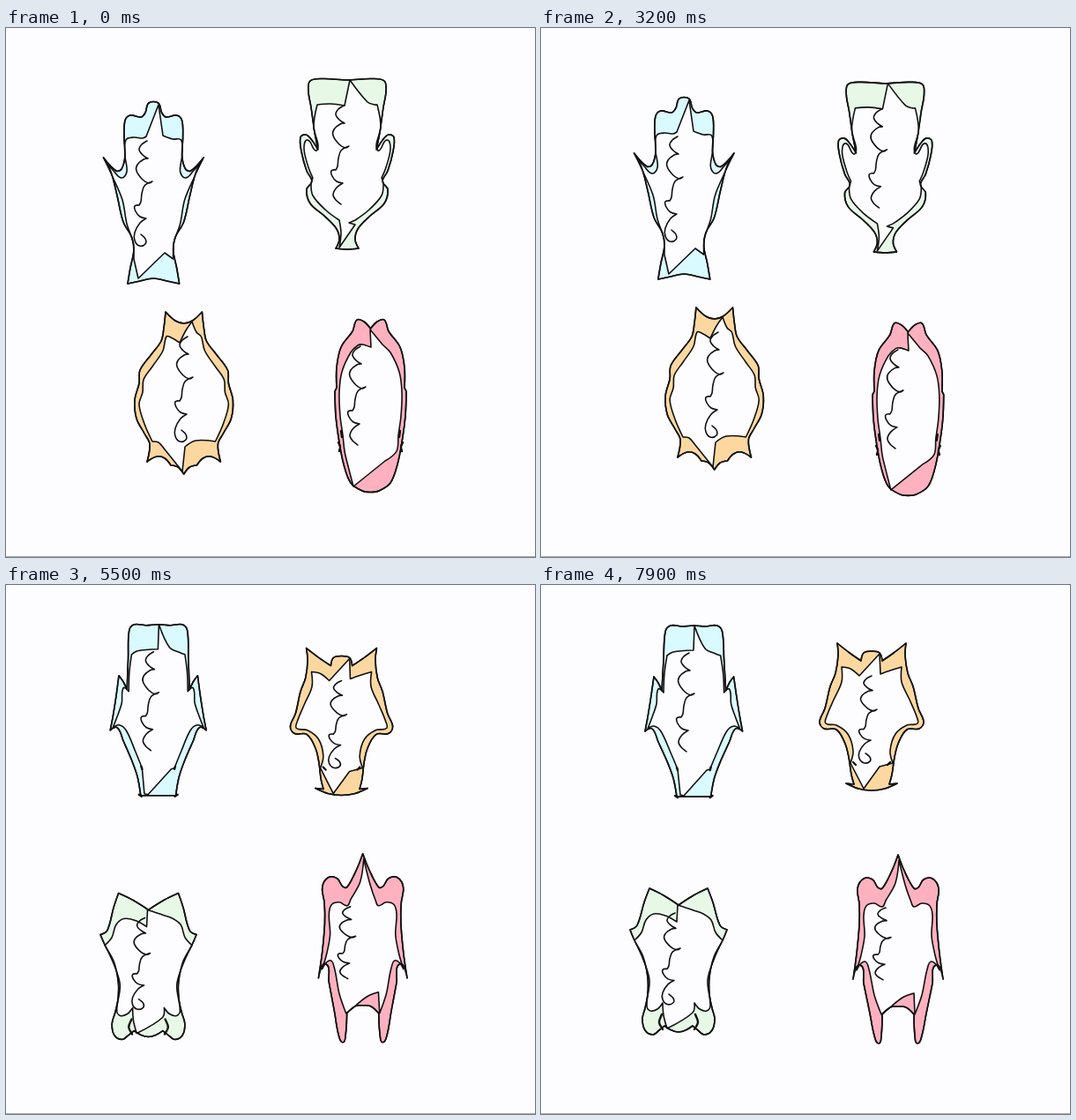
An HTML page with a canvas that plays this animation: 600x600 px, repeating every 8 s.

```html
<!DOCTYPE html>
<html>
<head>
<meta charset="utf-8">
<style>
html, body { margin: 0; width: 100%; height: 100%; overflow: hidden; background: #fdfcff; }
canvas { display: block; }
</style>
</head>
<body>
<canvas id="stage" width="600" height="600"></canvas>
<script>
const ctx = document.getElementById('stage').getContext('2d');
const PAPER = '#fdfcff', INK = '#111';
const BLUE = '#d9fafe', GREEN = '#e7f8e7', ORANGE = '#fcd8a0', PINK = '#ffb1bf';
const LOOP = 8000, STEP = 100, SWITCH = 4500, WOBBLE = 3600;

// Points are "x,y"; a trailing ! marks a sharp corner.
const parse = text => text.split(' ').filter(Boolean).map(p => {
  const [x, y] = p.split(',').map(parseFloat);
  return { x, y, sharp: p.endsWith('!') };
});

// outer and side list the left half from top to bottom; the right half is mirrored.
// top runs left to right, bottom right to left.
const early = [
  { color: BLUE, axis: 167.3, drift: [-7, -7, 0], curl: [160, 128, 1, true],
    outer: `167.3,83.5 161,86 158,96 153,101 141,99 135,105 134,125 135,145 131,160 125,162 110.5,147!
      119,163 126,190 133,220 143,238 145,252 141,272 138,290! 152,287 167.3,284`,
    top: '145,124 155,125 159,123! 173,87! 178,122! 189,126',
    side: '136,127 135,145 137,163 131,170 122,162 112,150! 121,169 132,195 137,222 144,243 145,262!',
    bottom: '180,255! 150,284!' },
  { color: GREEN, axis: 387, drift: [3.5, 4, 1], curl: [383, 88, 1, false],
    outer: `387,59 360,57.5 345,60 343,72 346,90 350,118 354,138! 346,126 340,121 334,124 335,140 341,162 347,174
      341,183 345,199 362,214 375,228 378,240 374,250! 387,251`,
    top: '368,86 384,88! 390,59! 410,84 418,87',
    side: '353,87! 349,112 354,133 351,139 342,127 338,137 343,158 348,170! 346,177 348,190 362,206 378,218!',
    bottom: '389,221! 396,223! 378,249! 380,233' },
  { color: ORANGE, axis: 201.7, drift: [-7, -7, 0], curl: [206, 350, 1, true],
    outer: `201.7,335 192,332 181,322! 179,340 176,355 165,370 152,388 151,403 146,422 148,443 157,460
      163,472 160,492! 171,486 180,488 187,496! 195,498 201.7,506!`,
    top: '187,351 197,357! 204,343 211,333! 216,345',
    side: '182,350 178,366 166,384 156,399 155,413 151,427 157,449 166,469!',
    bottom: '215,468 203,475! 200,503! 180,478 173,470' },
  { color: PINK, axis: 413.5, drift: [3, 4, 1], curl: [402, 361, 1, false],
    outer: `413.5,341! 406,333 398,331 393,344 380,362 375,385 375,408! 373,412! 374,440 378,470 383,495
      391,516 404,525 413.5,526.5`,
    top: '404,359 414,362! 413,342! 427,359',
    side: '399,360 391,368 381,390 378,413 379,440 382,462 384,480',
    bottom: '430,491! 394,520! 387,493',
    hands: ['380,457 381,464', '377,470 379,475 378,480'] }
];
const late = [
  { color: BLUE, axis: 173.3, drift: [2, 4, 1], curl: [168, 77, 1, false],
    outer: `173.3,46 160,47 147,46 141,53 139,85 137,120! 133,111 128,104! 125,125 121,150 118,166! 126,163
      133,178 143,200 150,219 154,240! 173.3,240`,
    top: '150,76 173,74! 174,46! 186,72 198,78',
    side: '143,80! 140,100 139,122! 133,118 131,135 126,150 121,163! 128,160 136,166 147,190 155,209!',
    bottom: '188,210! 162,239! 158,238!',
    hands: ['152,239 155,241', '154,207 155,210'] },
  { color: ORANGE, axis: 375, drift: [-8.4, -8.4, 0], curl: [375, 103, .83, true],
    outer: `375,75 366,77 363,86! 350,77 336,66! 337,80 334,100 328,115 322,140 316,155 321,163 335,164
      345,180 350,201! 352,215 355,226! 346,225! 360,231 375,233`,
    top: '351,95 361,103! 384,78! 385,101! 396,97',
    side: '341,93! 341,110 332,130 324,149 323,157 335,159 348,169 354,188 351,202!',
    bottom: '384,206! 366,231!',
    hands: ['354,201 357,204'] },
  { color: GREEN, axis: 156, drift: [-8.4, -8.4, 0], curl: [152, 372, .87, true],
    outer: `156,363! 139,352 123,344! 117,360 109,386 101,391! 106,403 116,422 121,445 121,464 118,480
      115,492 118,505 127,510 134,505 140,500! 148,505 156,507`,
    top: '141,375 154,382! 155,363! 173,369',
    side: '128,373 119,380 114,394 106,403! 116,425 123,448 120,477 124,483 132,481 138,474!',
    bottom: '172,485 143,503! 139,488',
    hands: ['137,487 134,496 138,504'] },
  { color: PINK, axis: 405, drift: [1, 4, 1], curl: [391, 366, .73, false],
    outer: `405,306! 398,324 387,344 382,343 376,334 366,333 359,344 361,362 361,385 358,418 354,447! 362,431
      366,452 373,486 378,511 383,520 386,511 387,487! 396,479 405,478`,
    top: '391,358 402,338 406,312! 413,340 420,360',
    side: '387,365 378,361 369,364 366,375 367,398 363,420 358,437! 367,427 372,436 378,465 386,487!',
    bottom: '423,463! 410,468 395,480!' }
];

for (const s of [...early, ...late]) {
  const mirror = pts => pts.map(p => ({ ...p, x: 2 * s.axis - p.x })).reverse();
  const left = parse(s.outer.replace(/\s+/g, ' ')), side = parse(s.side);
  s.outline = [...left, ...mirror(left).slice(1, -1)];
  s.inner = [...parse(s.top), ...mirror(side).reverse(), ...parse(s.bottom), ...[...side].reverse()];
  s.marks = (s.hands || []).map(parse).flatMap(h => [h, mirror(h)]);
  const ys = s.outline.map(p => p.y);
  s.y0 = Math.min(...ys);
  s.height = Math.max(...ys) - s.y0;
}

const curl = parse('0,0 -6,4 -9,10 -5,16 1,20! -4,21 -11,27 -12,34 -5,44 2,48 6,46! -3,51 -6,60 -7,69 -9,73! ' +
  '-14,74 -13,80 -8,86 -1,88! -8,93');
const tails = { true: parse('-14,104 -14,113 -9,119 -2,117 -2,111 -7,106'), false: parse('-12,101 -9,107 -3,112') };

function spline(pts, closed) {
  const n = pts.length;
  const at = i => closed ? pts[(i + n) % n] : pts[Math.max(0, Math.min(n - 1, i))];
  const handle = (i, reach) => {
    const p = at(i), a = at(i - 1), b = at(i + 1);
    if (p.sharp) return [p.x, p.y];
    const k = reach / 3 / (Math.hypot(b.x - a.x, b.y - a.y) || 1);
    return [p.x + (b.x - a.x) * k, p.y + (b.y - a.y) * k];
  };
  ctx.beginPath();
  ctx.moveTo(pts[0].x, pts[0].y);
  for (let i = 0; i < (closed ? n : n - 1); i++) {
    const p = at(i), q = at(i + 1), d = Math.hypot(q.x - p.x, q.y - p.y);
    ctx.bezierCurveTo(...handle(i, d), ...handle(i + 1, -d), q.x, q.y);
  }
  if (closed) ctx.closePath();
}

const travel = (sec, settles) => settles ? 1 - Math.exp(-sec / .9) : (sec / 4) ** 1.5;
const breath = ms => Math.cos(2 * Math.PI * ms / WOBBLE);

function drawShape(s, ms, start, ref) {
  const [dx, dy, settles] = s.drift;
  const moved = travel((ms - start) / 1000, settles) - travel((ref - start) / 1000, settles);
  const swell = .7 * (breath(ms) - breath(ref));
  // The waist swells while the head and feet draw in.
  const pose = p => {
    const away = Math.max(-1, Math.min(1, (p.x - s.axis) / 30));
    const bend = 2 * Math.sin(Math.PI * (p.y - s.y0) / s.height) - 1;
    return { ...p, x: p.x + dx * moved + away * swell * bend, y: p.y + dy * moved };
  };
  ctx.lineWidth = 1.6;
  spline(s.outline.map(pose), true);
  ctx.fillStyle = s.color;
  ctx.fill();
  ctx.stroke();
  spline(s.inner.map(pose), true);
  ctx.fillStyle = PAPER;
  ctx.fill();
  ctx.stroke();
  spline(s.outline.map(pose), true);
  ctx.stroke();

  const [cx, cy, scale, looped] = s.curl;
  spline([...curl, ...tails[looped]].map(p =>
    ({ ...p, x: cx + p.x + dx * moved, y: cy + p.y * scale + dy * moved })));
  ctx.stroke();
  ctx.lineWidth = 2.4;
  for (const m of s.marks) {
    spline(m.map(pose));
    ctx.stroke();
  }
}

function draw() {
  const ms = Math.floor(performance.now() % LOOP / STEP) * STEP;
  ctx.fillStyle = PAPER;
  ctx.fillRect(0, 0, 600, 600);
  ctx.fillStyle = '#aaa';
  ctx.fillRect(0, 599, 600, 1);
  ctx.strokeStyle = INK;
  ctx.lineJoin = ctx.lineCap = 'round';
  if (ms < SWITCH) early.forEach(s => drawShape(s, ms, 0, 0));
  else late.forEach(s => drawShape(s, ms, SWITCH, 7900));
  requestAnimationFrame(draw);
}
draw();
</script>
</body>
</html>
```
